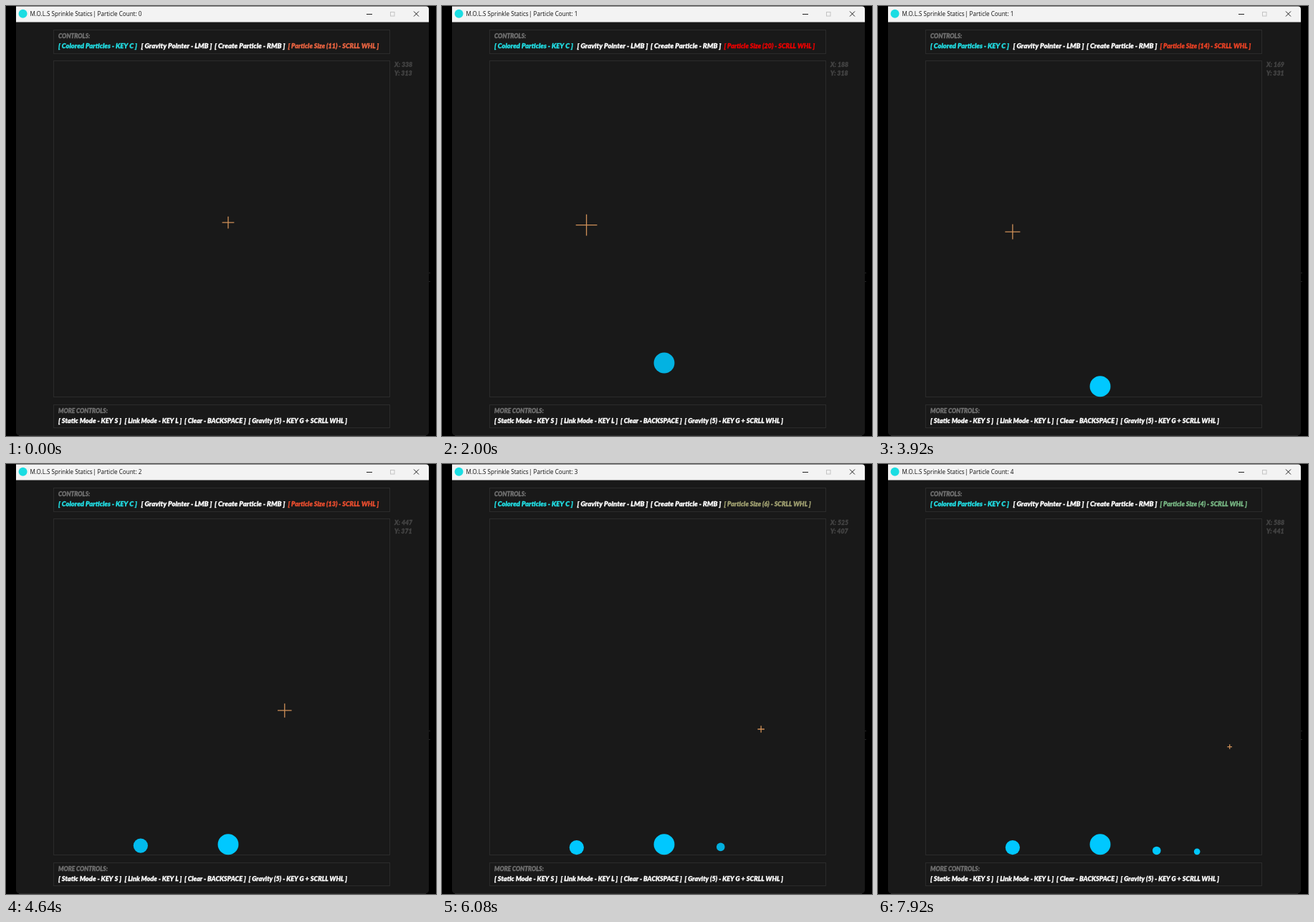
Recreate the animation shown at these times as an HTML page with a canvas. Size 600x600 px, loop 8 s.

```html
<!DOCTYPE html>
<html lang="en">
<head>
<meta charset="utf-8">
<title>Particle sandbox</title>
<style>
html, body { margin: 0; width: 100%; height: 100%; overflow: hidden; background: #000; }
canvas { display: block; width: 600px; height: 600px; }
</style>
</head>
<body>
<canvas id="stage" width="600" height="600"></canvas>
<script>
const ctx = document.getElementById("stage").getContext("2d");
const LOOP = 8000, TICK = 80;
const SCALE = 0.7228, LEFT = 65.7, TOP = 75.8, FLOOR = 545.2;
const GRAVITY = 1250, BOUNCE = 0.3, FADE = 640;
const GAME = "Lato, 'Open Sans', sans-serif";
const UI = "'Open Sans', 'Noto Sans', sans-serif";

const clamp = (v, lo, hi) => Math.min(hi, Math.max(lo, v));
const progress = (t, from, to) => clamp((t - from) / (to - from), 0, 1);
const px = x => LEFT + x * SCALE;
const py = y => TOP + y * SCALE;

// Pointer: each move ends at a new place
const moves = [
  { from: 1600, to: 2000, x: 188, y: 318 },
  { from: 2000, to: 2200, x: 169, y: 331 },
  { from: 4200, to: 4640, x: 447, y: 371 },
  { from: 5560, to: 5760, x: 525, y: 407 },
  { from: 6720, to: 7120, x: 588, y: 441 }
];

function pointer(t) {
  let x = 338, y = 313;
  for (const m of moves) {
    const k = progress(t, m.from, m.to);
    x += (m.x - x) * k;
    y += (m.y - y) * k;
  }
  return { x, y };
}

// Each turn of the wheel adds to the brush size
const turns = [
  { from: 0, to: 320, by: 9 },
  { from: 2560, to: 2880, by: -3 },
  { from: 3120, to: 3440, by: -3 },
  { from: 4560, to: 5120, by: -6 },
  { from: 5920, to: 6080, by: -2 },
  { from: 7600, to: 7840, by: -2 }
];

function brushSize(t) {
  return Math.round(turns.reduce((s, w) => s + w.by * progress(t, w.from, w.to), 11));
}

function sizeColor(s) {
  const rgb = [40 + 20 * s, 230 - 11.7 * s, 170 - 9.5 * s];
  return "rgb(" + rgb.map(v => Math.round(clamp(v, 0, 235))) + ")";
}

const drops = [1440, 4050, 5528, 6560].map(t => ({ t, r: brushSize(t) * SCALE, ...pointer(t) }));

function fall(y0, rest, s) {
  const hit = Math.sqrt(2 * (rest - y0) / GRAVITY);
  if (s < hit) return y0 + GRAVITY * s * s / 2;
  s -= hit;
  let v = GRAVITY * hit * BOUNCE;
  while (v > 15) {
    const air = 2 * v / GRAVITY;
    if (s < air) return rest - v * s + GRAVITY * s * s / 2;
    s -= air;
    v *= BOUNCE;
  }
  return rest;
}

function uiText(str, x, y) {
  ctx.font = "8.1px " + UI;
  ctx.fillStyle = "#111";
  ctx.fillText(str, x, y);
}

// Heavy italic lettering, thickened by a thin outline
function label(str, x, y, size, color) {
  ctx.font = "italic 900 " + size + "px " + GAME;
  ctx.fillStyle = ctx.strokeStyle = color;
  ctx.lineWidth = 0.3;
  ctx.fillText(str, x, y);
  ctx.strokeText(str, x, y);
}

function line(color, width, ...segments) {
  ctx.strokeStyle = color;
  ctx.lineWidth = width;
  ctx.beginPath();
  for (const [x1, y1, x2, y2] of segments) {
    ctx.moveTo(x1, y1);
    ctx.lineTo(x2, y2);
  }
  ctx.stroke();
}

function box(x, y, w, h, color) {
  ctx.strokeStyle = color;
  ctx.lineWidth = 1;
  ctx.strokeRect(x, y, w, h);
}

function panel(x, y, w, h, radii, color) {
  ctx.fillStyle = color;
  ctx.beginPath();
  ctx.roundRect(x, y, w, h, radii);
  ctx.fill();
}

function disc(x, y, r, color) {
  ctx.fillStyle = color;
  ctx.beginPath();
  ctx.arc(x, y, r, 0, Math.PI * 2);
  ctx.fill();
}

function drawWindow(count) {
  ctx.fillStyle = "#000";
  ctx.fillRect(0, 0, 600, 600);
  panel(14, 0.5, 576, 599, [0, 4, 5, 5], "#191919");
  panel(14, 0.5, 576, 22, [0, 4, 0, 0], "#f3f3f3");
  line("#2c2c2c", 1, [18, 599.5, 586, 599.5]);
  line("#242424", 1, [590, 372.5, 592, 372.5], [590, 384.5, 592, 384.5]);

  disc(23.6, 10.8, 6, "#1bdde2");
  uiText("M.O.L.S Sprinkle Statics", 33.5, 14);
  uiText("| Particle Count: " + count, 121, 14);
  line("#222", 1, [503, 11.5, 511, 11.5]);
  box(536.5, 8.5, 5.5, 5.5, "#c4c4c4");
  line("#222", 1, [569, 7.5, 576, 14.5], [576, 7.5, 569, 14.5]);

  box(66.5, 33.5, 469, 33, "#2b2b2b");
  box(66.5, 76.5, 469, 469, "#2b2b2b");
  box(66.5, 556.5, 469, 32, "#2b2b2b");
}

function drawLabels(size, x, y) {
  label("CONTROLS:", 73, 44.9, 8.4, "#707070");
  label("[ Colored Particles - KEY C ]", 73, 59.2, 9.45, "#22e0e6");
  label("[ Gravity Pointer - LMB ]", 188.5, 59.2, 9.6, "#fff");
  label("[ Create Particle - RMB ]", 291, 59.2, 9.6, "#fff");
  label("[ Particle Size (" + size + ") - SCRLL WHL ]", 393.5, 59.2, 9.05, sizeColor(size));

  label("MORE CONTROLS:", 73, 567.9, 8.3, "#707070");
  label("[ Static Mode - KEY S ]", 73, 582.2, 9.3, "#fff");
  label("[ Link Mode - KEY L ]", 165.5, 582.2, 9.1, "#fff");
  label("[ Clear - BACKSPACE ]", 249, 582.2, 9.1, "#fff");
  label("[ Gravity (5) - KEY G + SCRLL WHL ]", 338.5, 582.2, 9.1, "#fff");

  label("X: " + Math.round(x), 542, 85.2, 8.8, "#444");
  label("Y: " + Math.round(y), 542, 96.7, 8.8, "#444");
}

function drawDrop(d, t) {
  const age = t - d.t;
  ctx.globalAlpha = progress(age, 0, FADE);
  disc(px(d.x), fall(py(d.y), FLOOR - d.r, age / 1000), d.r, "#00c8ff");
  ctx.globalAlpha = 1;
}

function draw(t) {
  const live = drops.filter(d => t >= d.t);
  const { x, y } = pointer(t);
  const size = brushSize(t);
  drawWindow(live.length);
  drawLabels(size, x, y);
  live.forEach(d => drawDrop(d, t));
  const cx = px(x), cy = py(y), arm = size * SCALE + 0.4;
  line("#cf9058", 1.3, [cx - arm, cy, cx + arm, cy], [cx, cy - arm, cx, cy + arm]);
}

const start = performance.now();
function loop() {
  const t = (performance.now() - start) % LOOP;
  draw(Math.floor(t / TICK) * TICK);
  requestAnimationFrame(loop);
}
loop();
</script>
</body>
</html>
```
